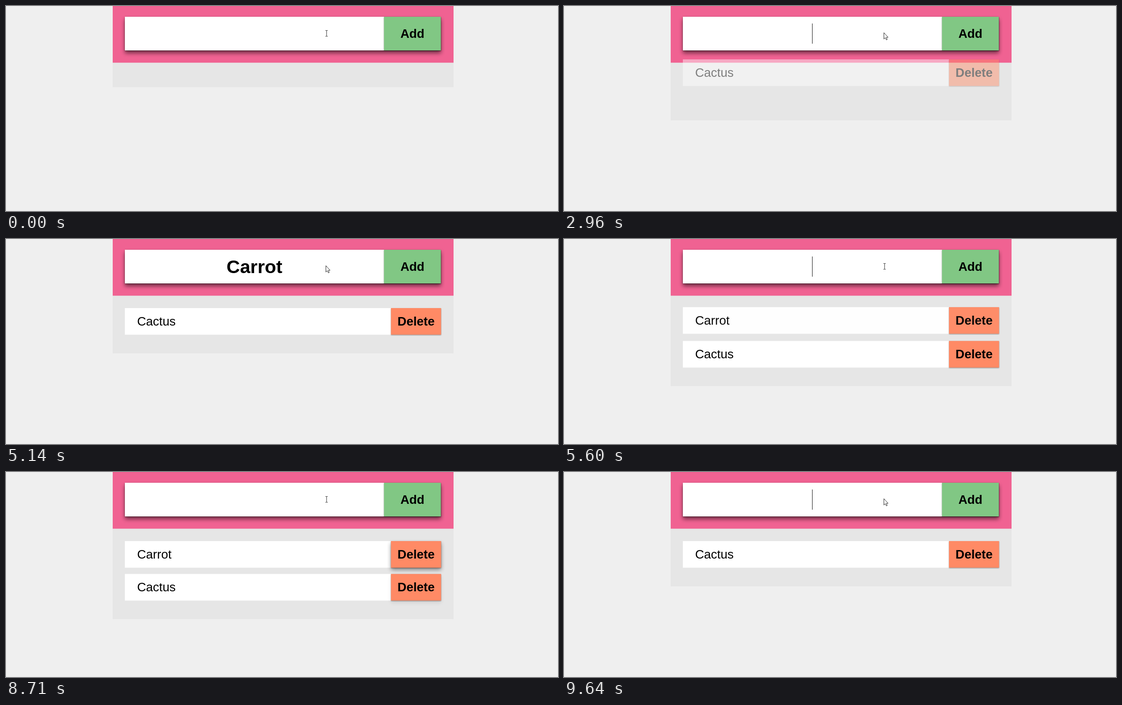
These frames come from a looping animation (1226 px wide and 457 px high, 9.72 s). An HTML page:

```html
<!DOCTYPE html>
<html lang="en">
<head>
<meta charset="utf-8">
<title>List</title>
<style>
  html, body { margin: 0; width: 100%; height: 100%; overflow: hidden; background: #efefef; }
  svg { display: block; width: 1226px; height: 457px; }
  text { font-family: "Liberation Sans", Arial, sans-serif; font-size: 27.5px; }
  .bold { font-weight: bold; }
  .mid { text-anchor: middle; }
  .entry { font-size: 41.25px; }
</style>
</head>
<body>
<svg viewBox="0 0 1226 457">
  <defs>
    <filter id="soft" x="-30%" y="-60%" width="160%" height="220%"><feGaussianBlur stdDeviation="5"/></filter>
    <filter id="thin" x="-10%" y="-20%" width="120%" height="140%"><feGaussianBlur stdDeviation="1"/></filter>
    <g id="button">
      <rect y="1" width="111.3" height="59.3" opacity=".42" filter="url(#thin)"/>
      <rect width="111.3" height="59.3" fill="#ff8a65"/>
      <text class="bold mid" x="55.8" y="39">Delete</text>
    </g>
  </defs>

  <rect id="panel" x="237" y="126" width="757" height="55" fill="#e6e6e6"/>
  <rect x="237" width="757" height="126.4" fill="#f06292"/>
  <rect x="264" y="30" width="702" height="75" opacity=".53" filter="url(#soft)"/>
  <rect x="264" y="25" width="702" height="75" opacity=".4" filter="url(#thin)"/>
  <rect x="264" y="24" width="576" height="75" fill="#fff"/>

  <rect id="addGlow" x="839.5" y="29" width="126.3" height="75" filter="url(#soft)"/>
  <rect x="839.5" y="25" width="126.3" height="75" opacity=".4" filter="url(#thin)"/>
  <rect x="839.5" y="24" width="126.3" height="75" fill="#81c784"/>
  <text class="bold mid" x="902.7" y="71">Add</text>

  <text id="entry" class="bold mid entry" x="551.75" y="76"></text>
  <rect id="caret" y="39" width="1" height="45" fill="#111"/>

  <g id="cactus">
    <rect x="264" width="591" height="59.3" fill="#fff"/>
    <text x="291.2" y="39">Cactus</text>
    <rect class="glow" x="855" y="5" width="111.3" height="59.3" filter="url(#soft)"/>
    <use href="#button" x="855"/>
  </g>
  <g id="carrot">
    <rect x="264" width="591" height="59.3" fill="#fff"/>
    <text x="291.2" y="39">Carrot</text>
    <rect class="glow" x="855" y="5" width="111.3" height="59.3" filter="url(#soft)"/>
    <use href="#button" x="855"/>
  </g>

  <path id="beam" d="M709.5 54.5h2l.5 .5 .5-.5h2M712 55v12M709.5 67.5h2l.5-.5 .5 .5h2" fill="none" stroke="#222"/>
  <path id="arrow" d="M710.5 59.5v14.2l3.2-3 2.1 4.8 2.2-.9-2.1-4.7h4z" fill="#fff" stroke="#222"/>
</svg>
<script>
const LOOP = 9720, ENTER = 300, FADE = 230, ROW = 73.3, LIFT = 64;
const ADD1 = 2880, ADD2 = 5370, TAB1 = 6540, TAB2 = 7310, TAB3 = 8630, REMOVE = 9240;

const words = [
  { text: "Cactus", keys: [1250, 1550, 1740, 1940, 2140, 2330], end: ADD1 },
  { text: "Carrot", keys: [3580, 3740, 3970, 4130, 4280, 4440], end: ADD2 }
];
const caretOn = [[380, 930], [1250, 2730], [ADD1, 3410], [3580, 4990],
                 [ADD2, 5830], [6380, TAB1], [REMOVE, LOOP]];

const $ = id => document.getElementById(id);
const [panel, addGlow, entry, caret, cactus, carrot, beam, arrow] =
  ["panel", "addGlow", "entry", "caret", "cactus", "carrot", "beam", "arrow"].map($);
const show = (el, on) => el.setAttribute("visibility", on ? "visible" : "hidden");
const within = (t, a, b) => t >= a && t < b;

// cubic-bezier(.25, .1, .25, 1)
function ease(x) {
  if (x <= 0) return 0;
  if (x >= 1) return 1;
  let lo = 0, hi = 1;
  for (let i = 0; i < 24; i++) {
    const s = (lo + hi) / 2, r = 1 - s;
    if (.75 * r * r * s + .75 * r * s * s + s ** 3 < x) lo = s; else hi = s;
  }
  return .3 * (1 - lo) ** 2 * lo + 3 * (1 - lo) * lo * lo + lo ** 3;
}

const focus = (t, from, to) => .5 * (ease((t - from + 40) / FADE) - ease((t - to + 40) / FADE));

function place(item, row, since, on, glow) {
  const p = ease(since / ENTER);
  show(item, on);
  item.setAttribute("opacity", p);
  item.setAttribute("transform", `translate(0 ${154 + row * ROW - LIFT * (1 - p)})`);
  item.querySelector(".glow").setAttribute("opacity", glow);
}

function draw(t) {
  const both = within(t, ADD2, REMOVE);
  const count = t < ADD1 ? 0 : both ? 2 : 1;
  panel.setAttribute("height", Math.round(55.4 + count * ROW));

  const word = words.find(w => within(t, w.keys[0], w.end));
  entry.textContent = word ? word.text.slice(0, word.keys.filter(k => k <= t).length) : "";
  const half = word ? entry.getComputedTextLength() / 2 : 0;
  caret.setAttribute("x", Math.floor(551.75 + half));
  show(caret, caretOn.some(([a, b]) => within(t, a, b)));

  addGlow.setAttribute("opacity", focus(t, TAB1, TAB2));
  place(cactus, both ? 1 : 0, t - (t < REMOVE ? ADD1 : REMOVE), count > 0,
        t < REMOVE ? focus(t, TAB2, TAB3) : 0);
  place(carrot, 0, t - ADD2, both, focus(t, TAB3, LOOP * 2));

  const pointer = within(t, ADD1, ADD2) || t >= REMOVE;
  show(arrow, pointer);
  show(beam, !pointer);
}

const start = performance.now();
function tick() {
  draw((performance.now() - start) % LOOP);
  requestAnimationFrame(tick);
}
tick();
</script>
</body>
</html>
```
